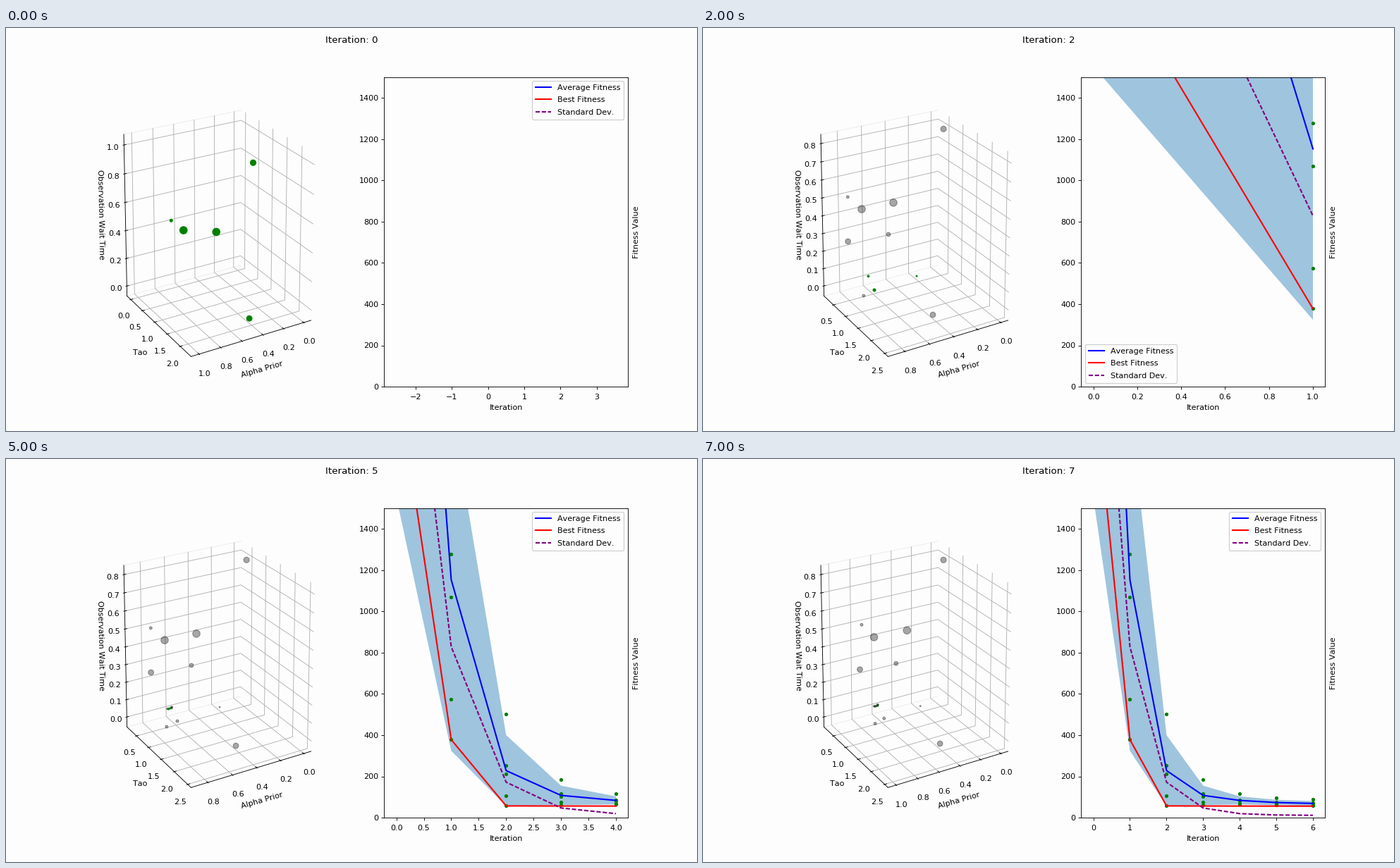
Recreate the animation shown at these times as a matplotlib script. Size 980 by 572 pixels, loop 8 s.

```python
import numpy as np
import matplotlib.pyplot as plt
from matplotlib.animation import FuncAnimation

W, H, DPI = 980, 572, 80
PAPER = "#fdfdfd"
STEPS = 8
plt.rcParams.update({"font.family": "DejaVu Sans", "font.size": 10,
                     "text.kerning_factor": 6, "xtick.major.pad": 5,
                     "lines.linewidth": 1.9,
                     "axes.facecolor": PAPER, "figure.facecolor": PAPER})

# Wide-ranging candidates of the first rounds: alpha, tao, wait, radius in px
SCOUTS = [
    [(.87, .84, .575, 2.5), (.78, .945, .506, 5.8), (.82, 2.322, .697, 5.8),
     (0, .56, .795, 4.6), (.46, 2.141, .011, 4.4)],
    [(.77, .326, .254, 4.4), (.50, .667, .288, 3.4), (.745, .816, 0, 2.5)],
    [(.25, .637, 0, 1.5), (.64, .747, .004, 2.5)],
]
OPTIMUM = np.array([.62, .335, .02])
SCATTER = np.array([.04, .03, .006])

# Oblique camera with mild perspective
AZIM, ELEV, DIST = np.radians(60), np.radians(20), 10
RIGHT = np.array([-np.sin(AZIM), np.cos(AZIM), 0])
TOWARD = np.array([np.cos(ELEV) * np.cos(AZIM),
                   np.cos(ELEV) * np.sin(AZIM), np.sin(ELEV)])
UP = np.cross(TOWARD, RIGHT)
CENTER = np.array([299.8, 282.9])
SCALE = np.array([1866, -2380])
EDGE = 0.5 + 1 / 48
LABEL_GAP = 0.069


def settled(i):
    """Candidates gathering ever closer around the optimum."""
    if i < 2:
        return []
    rng = np.random.default_rng(i)
    shrink = 0.75 ** (i - 2)
    spots = OPTIMUM + SCATTER * shrink * rng.uniform(-1, 1, (1 + (i > 2), 3))
    return [(*spot, 1.9 * 0.92 ** (i - 2)) for spot in spots]


def curve(keys, floor, rate):
    """Key values followed by an exponential approach to the floor."""
    tail = np.arange(1, STEPS - len(keys))
    return np.append(keys, floor + (keys[-1] - floor) * rate ** tail)


SWARM = [(SCOUTS[i] if i < len(SCOUTS) else []) + settled(i)
         for i in range(STEPS)]
AVERAGE = curve((4610, 1152, 228, 108), 66, 0.42)
SPREAD = curve((3058, 828, 172, 47), 11, 0.24)
BEST = curve((2159, 378, 57), 55, 0.8)
SCORES = np.array([1.6, .15, -.1, -.7, -1])

fig = plt.figure(figsize=(W / DPI, H / DPI), dpi=DPI)
scene = fig.add_axes([0, 0, 1, 1])
chart = fig.add_axes([536.3 / W, 62.9 / H, 345.7 / W, 439.5 / H])
title = fig.suptitle("")


def project(p):
    p = np.asarray(p, float)
    flat = np.stack([p @ RIGHT, p @ UP], axis=-1)
    return CENTER + SCALE * flat / (DIST - p @ TOWARD)[..., None]


def limits(i):
    if i == 0:
        return np.array([(-.05, 1.05), (-.112, 2.352), (-.05, 1.05)])
    alpha = (-.0435, .9135) if i < 6 else (-.05, 1.05)
    return np.array([alpha, (.15, 2.57), (-.04, .832)])


def marker_area(radius):
    """Scatter size whose outline, 1 pt wide, ends at the given radius in px."""
    return (2 * np.asarray(radius) * 72 / DPI - 1) ** 2


def path(points, **style):
    xy = project(points)
    scene.plot(xy[:, 0], xy[:, 1], **style)


def draw_axis(axis, lim, step):
    """Grid, ticks and numbers of one axis: 0 alpha, 1 tao, 2 wait time."""
    home = [(0, EDGE, -EDGE), (EDGE, 0, -EDGE), (EDGE, -EDGE, 0)][axis]
    corner = (-EDGE, -EDGE, -EDGE)
    far = [(0, -EDGE, EDGE), (-EDGE, 0, EDGE), (-EDGE, EDGE, 0)][axis]
    tick_dir = np.eye(3)[1 if axis == 0 else 0]
    outward = np.sign(home)

    def at(base, t):
        p = np.array(base, float)
        p[axis] = t
        return p

    first, last = int(np.ceil(lim[0] / step)), int(lim[1] / step)
    for n in range(first, last + 1):
        t = (n * step - lim[0]) / (lim[1] - lim[0]) - 0.5
        start = at(home, t)
        path([start, at(corner, t), at(far, t)],
             color="#b0b0b0", lw=0.8, zorder=1)
        path([start + tick_dir / 120, start - tick_dir / 60],
             color="black", lw=0.8, zorder=3)
        x, y = project(start + LABEL_GAP * outward) + 1
        scene.text(x, y, f"{n * step:.1f}", ha="center", va="top")
    path([at(home, -EDGE), at(home, EDGE)], color="black", lw=0.8, zorder=2)


def draw_points(points, lim, **style):
    if not points:
        return
    data = np.array(points)
    unit = (data[:, :3] - lim[:, 0]) / (lim[:, 1] - lim[:, 0]) - 0.5
    xy = project(unit)
    scene.scatter(xy[:, 0], xy[:, 1], s=marker_area(data[:, 3]),
                  linewidths=1, **style)


def draw_scene(i):
    scene.clear()
    scene.set(xlim=(0, W), ylim=(H, 0))
    scene.axis("off")
    lim = limits(i)
    for z in (-EDGE, EDGE):
        path([(EDGE, -EDGE, z), (-EDGE, -EDGE, z)],
             color="#ebebeb", lw=0.8, zorder=0)
    steps = (0.2, 0.5, 0.2 if i == 0 else 0.1)
    for axis in range(3):
        draw_axis(axis, lim[axis], steps[axis])
    middle = dict(ha="center", va="center")
    scene.text(363.5, 484.5, "Alpha Prior", rotation=16, **middle)
    scene.text(190.5, 460.5, "Tao", **middle)
    scene.text(134.5, 264.5, "Observation Wait Time", rotation=-89, **middle)
    draw_points(sum(SWARM[:i], []), lim, color="black", alpha=0.34, zorder=4)
    draw_points(SWARM[i], lim, color="green", zorder=5)


def chart_range(i):
    if i == 0:
        return -2.87, 3.865
    if i == 1:
        return -.000455, .000455
    span = i - 1
    return -.0555 * span, 1.0545 * span


def draw_chart(i):
    chart.clear()
    x = np.arange(i)
    chart.plot(x, AVERAGE[:i], color="blue", label="Average Fitness")
    chart.plot(x, BEST[:i], color="red", label="Best Fitness")
    chart.plot(x, SPREAD[:i], color="purple", label="Standard Dev.",
               linestyle=(0, (2.9, 1.25)))
    if i > 1:
        chart.fill_between(x, (AVERAGE - SPREAD)[:i], (AVERAGE + SPREAD)[:i],
                           color="#1f77b4", alpha=0.42, lw=0)
    for k in range(1, i):
        fitness = np.maximum(AVERAGE[k] + SPREAD[k] * SCORES, BEST[k])
        chart.scatter(np.full(len(fitness), k), fitness, color="green",
                      s=marker_area(2.6), linewidths=1)
    chart.set(xlim=chart_range(i), ylim=(0, 1500))
    chart.set_xlabel("Iteration", labelpad=5)
    chart.set_ylabel("Fitness Value", labelpad=6)
    chart.yaxis.set_label_position("right")
    chart.legend(loc="lower left" if i == 2 else "upper right",
                 framealpha=1, labelspacing=0.67, borderpad=0.43)


def update(i):
    title.set_text(f"Iteration: {i}")
    draw_scene(i)
    draw_chart(i)
    return []


anim = FuncAnimation(fig, update, frames=STEPS, interval=1000,
                     init_func=lambda: [], repeat=True, repeat_delay=0)
plt.show()
```
